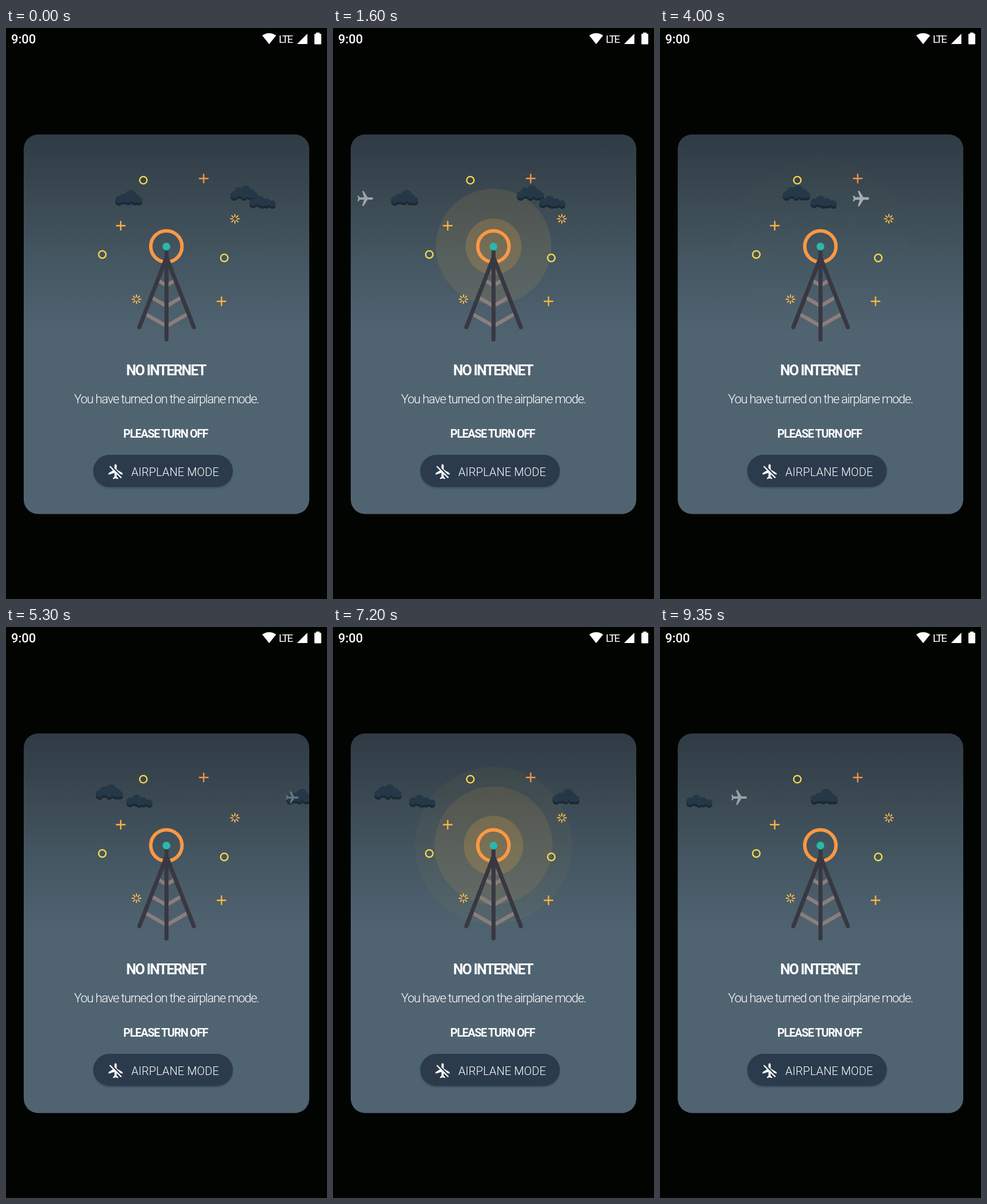
Animation, 561 px wide and 998 px high, one loop 9.4 s. Source, as an HTML page:

```html
<!DOCTYPE html>
<html lang="en">
<head>
<meta charset="utf-8">
<title>No internet</title>
<style>
  html, body { margin: 0; width: 100%; height: 100%; overflow: hidden; background: #020402; }
  svg { display: block; width: 100%; height: 100%; }
  text { font-family: Roboto, "Open Sans", sans-serif; fill: #fff; white-space: pre; }
  .title { font-size: 25px; font-weight: 700; letter-spacing: -1.8px; }
  .body { font-size: 22px; font-weight: 300; letter-spacing: -1.25px; }
  .hint { font-size: 19.8px; font-weight: 700; letter-spacing: -1.35px; }
  .label { font-size: 20px; font-weight: 300; letter-spacing: .1px; }
  .clock { font-size: 22px; font-weight: 500; }
  .net { font-size: 19px; letter-spacing: -2.2px; }
  .line { fill: none; stroke-linecap: round; stroke-linejoin: round; }
</style>
</head>
<body>
<svg viewBox="0 0 561 998">
  <defs>
    <linearGradient id="sky" gradientUnits="userSpaceOnUse" x1="0" y1="186" x2="0" y2="535">
      <stop offset="0" stop-color="#303b45"/>
      <stop offset=".3" stop-color="#3a4851"/>
      <stop offset=".62" stop-color="#445661"/>
      <stop offset="1" stop-color="#506371"/>
    </linearGradient>
    <clipPath id="card"><rect x="31" y="186" width="499" height="663.5" rx="25"/></clipPath>
    <filter id="soft" x="-10%" y="-20%" width="120%" height="150%"><feGaussianBlur stdDeviation="1.8"/></filter>
  </defs>

  <rect width="561" height="998" fill="#020402"/>

  <g fill="#fff">
    <text class="clock" x="9" y="27">9:00</text>
    <path transform="translate(447.6 6) scale(1.03)" d="M12 21.5L23.64 7c-.45-.34-4.93-4-11.64-4C5.28 3 .81 6.66.36 7z"/>
    <text class="net" x="476.7" y="25.6">LTE</text>
    <path d="M508.7 28H526.7V10Z"/>
    <rect x="539" y="10" width="12" height="18.5" rx="1.3"/>
    <rect x="542" y="8" width="6" height="4"/>
  </g>

  <g clip-path="url(#card)">
    <rect x="31" y="186" width="499" height="664" fill="url(#sky)"/>
    <g id="waves" fill="#fdb540"></g>
    <g id="stars" class="line" stroke-width="2.4"></g>

    <g class="line" stroke="#8a7e7c" stroke-width="6.5" style="stroke-linecap:butt;stroke-linejoin:miter">
      <path d="M267 442L280.5 450L294 442M255 471L280.5 486L306 471M244 500L280.5 521L317 500"/>
    </g>
    <circle cx="280.3" cy="381.7" r="27.3" fill="none" stroke="#fd9844" stroke-width="6"/>
    <path class="line" stroke="#383842" stroke-width="7.2" d="M280.5 391V544.5M280.5 401L233 523M280.5 401L328.3 523"/>
    <circle cx="280.4" cy="382" r="6.8" fill="#2bb8aa"/>

    <g id="clouds"></g>
    <path id="plane" fill="#fff" d="M21 16v-2l-8-5V3.5c0-.83-.67-1.5-1.5-1.5S10 2.67 10 3.5V9l-8 5v2l8-2.5V19l-2 1.5V22l3.5-1 3.5 1v-1.5L13 19v-5.5l8 2.5z"/>

    <text class="title" x="210" y="607">NO INTERNET</text>
    <text class="body" x="119" y="655.5">You have turned on the airplane mode.</text>
    <text class="hint" x="205" y="716">PLEASE TURN OFF</text>

    <rect x="153" y="748" width="243" height="56" rx="28" fill="#1d2a35" opacity=".45" filter="url(#soft)"/>
    <rect x="152.5" y="746" width="244" height="56" rx="28" fill="#2b3b4c"/>
    <path fill="#fff" transform="translate(191.5 775.5) scale(1.29) translate(-11.5 -12)" d="M13 9V3.5c0-.83-.67-1.5-1.5-1.5S10 2.67 10 3.5v3.68l7.83 7.83L21 16v-2l-8-5zM3 5.27l4.99 4.99L2 14v2l8-2.5V19l-2 1.5V22l3.5-1 3.5 1v-1.5L13 19v-3.73L18.73 21 20 19.73 4.27 4 3 5.27z"/>
    <text class="label" x="219" y="783">AIRPLANE MODE</text>
  </g>
</svg>
<script>
const LOOP = 9400, STEP = 50;
const $ = id => document.getElementById(id);

function add(parent, tag, attrs) {
  const el = document.createElementNS('http://www.w3.org/2000/svg', tag);
  for (const k in attrs) el.setAttribute(k, attrs[k]);
  return parent.appendChild(el);
}

// Stars
const stars = $('stars');
for (const [cx, cy] of [[240, 266], [168.3, 395.8], [381.5, 401.8]])
  add(stars, 'circle', { cx, cy, r: 6.4, stroke: '#f9d94c' });
for (const [x, y, stroke] of [[345.5, 263, '#f79348'], [200.5, 345.5, '#fdb441'], [376.7, 477.7, '#fdb441']])
  add(stars, 'path', { d: `M${x - 7.4} ${y}h14.8M${x} ${y - 7.4}v14.8`, stroke });
for (const [x, y] of [[400, 333.5], [228, 474]]) {
  let d = '';
  for (let i = 0; i < 8; i++) {
    const c = Math.cos(i * Math.PI / 4), s = Math.sin(i * Math.PI / 4);
    d += `M${x + 3.8 * c} ${y + 3.8 * s}L${x + 7.6 * c} ${y + 7.6 * s}`;
  }
  add(stars, 'path', { d, stroke: '#fdba4c', 'stroke-width': 2 });
}

// Clouds: puffs are [x, y, radius]; x and speed in px and px/s
const clouds = [
  { x: 214.5, y: 297, speed: 56, wrap: 596,
    puffs: [[-17, 3, 6.5], [-9, 0, 7.5], [3.5, -4.5, 9.5], [11, 1, 8], [18, 3.5, 5.5], [-1, 3, 6]] },
  { x: 416, y: 289, speed: 44.45,
    puffs: [[-17, 2.5, 6.5], [-9, -2.5, 8], [3, -4.5, 9.5], [12, 0.5, 8], [18.5, 3, 5.5], [0, 3, 6]] },
  { x: 448, y: 304, speed: 40.6,
    puffs: [[-16, 0.5, 6.5], [-5, -2.5, 8.5], [7, 0.5, 7], [17.5, 2.5, 5.5], [0, 2, 6]] }
];
for (const c of clouds) {
  c.el = add($('clouds'), 'g', {});
  for (const [dy, fill] of [[4, '#1a2934'], [0, '#253848']])
    for (const [cx, cy, r] of c.puffs) add(c.el, 'circle', { cx, cy: cy + dy, r, fill });
}

// Signal waves: two bursts of three rings
const WAVE = 2.58, REACH = 157;
const waves = [];
for (const burst of [0.56, 5.53])
  for (let i = 0; i < 3; i++)
    waves.push({ start: burst + i * 0.6, el: add($('waves'), 'circle', { cx: 280.5, cy: 382 }) });

function drawWave({ start, el }, t) {
  const u = (t - start) / WAVE;
  const e = u > 0 && u < 1 ? 1 - (1 - u) ** 2 : 0;
  el.setAttribute('r', REACH * e);
  el.setAttribute('fill-opacity', 0.27 * (1 - e));
}

function drawCloud(c, t) {
  let x = c.x - c.speed * t;
  if (c.wrap && x < -20) x += c.wrap;
  c.el.setAttribute('transform', `translate(${x} ${c.y})`);
}

const FLIGHT = 6.975, SWELL = 5.15, PEAK = 2.88;
function drawPlane(t) {
  const u = ((t + 0.02) % FLIGHT) / FLIGHT;
  const x = 280 - 300 * Math.cos(Math.PI * u);
  const e = (1 + Math.cos(2 * Math.PI * (t - PEAK) / SWELL)) / 2;
  const size = (22 + 10.6 * e) / 20;
  const el = $('plane');
  el.setAttribute('transform', `translate(${x} 298) rotate(90) scale(${size}) translate(-11.5 -12)`);
  el.setAttribute('fill-opacity', 0.3 + 0.4 * e);
}

function render(ms) {
  const t = Math.floor((ms % LOOP) / STEP) * STEP / 1000;
  waves.forEach(w => drawWave(w, t));
  clouds.forEach(c => drawCloud(c, t));
  drawPlane(t);
}

const begin = performance.now();
function tick() {
  render(performance.now() - begin);
  requestAnimationFrame(tick);
}
tick();
</script>
</body>
</html>
```
